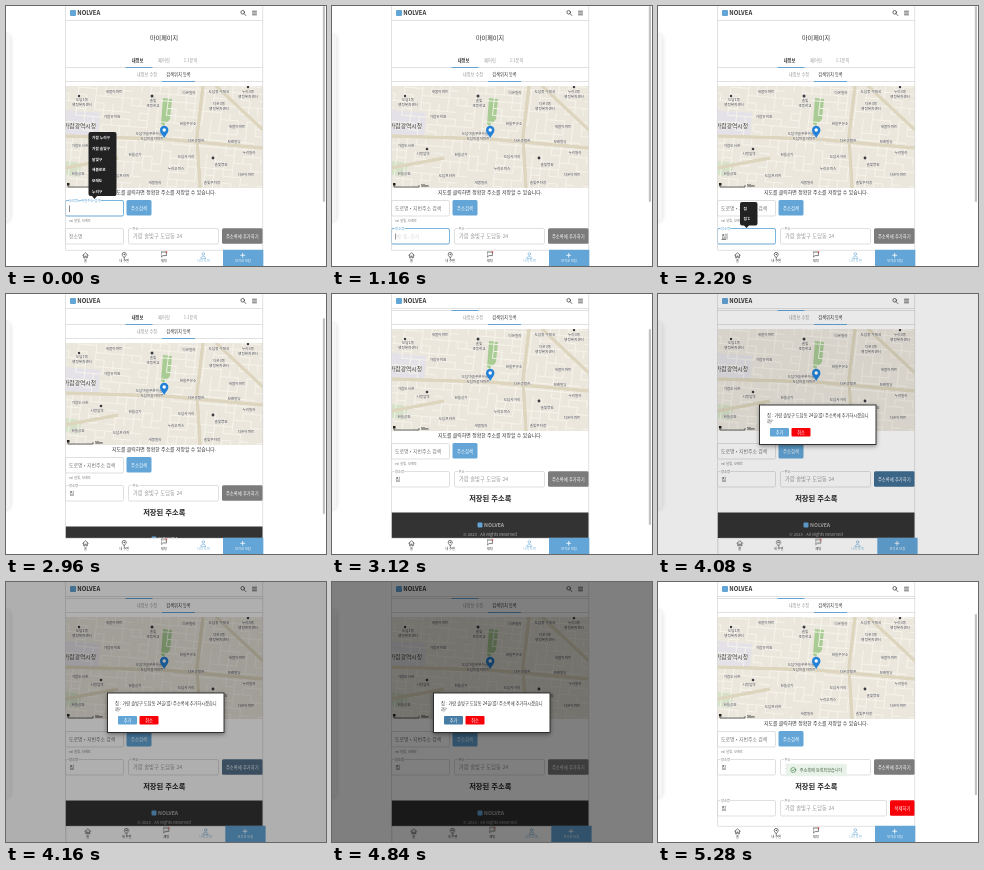
Write an HTML page that moves like this. It is 320 px wide and 260 px high and loops after 5360 ms.

```html
<!DOCTYPE html>
<html lang="ko">
<head>
<meta charset="utf-8">
<title>마이페이지</title>
<style>
html, body { margin: 0; width: 100%; height: 100%; overflow: hidden; background: #fff; }
svg { display: block; width: 100vw; height: 100vh; }
text { font-family: "Noto Sans CJK KR", "Noto Sans CJK", "Noto Sans", sans-serif; font-size: 4.9px; fill: #333; white-space: pre; }
.mid { text-anchor: middle; }
.bold { font-weight: 700; }
.white { fill: #fff; }
.gray { fill: #999; }
.line { fill: none; stroke: #444; stroke-width: .8; stroke-linecap: round; stroke-linejoin: round; }
.rule { stroke: #d4d4d4; stroke-width: .7; }
.box { fill: #fff; stroke: #cacaca; stroke-width: .6; }
.focus { fill: none; stroke: #6fb0de; stroke-width: .9; }
.blue { fill: #62a5d6; }
.legend { font-size: 3.2px; fill: #777; stroke: #fff; stroke-width: 1.6px; paint-order: stroke; }
.label { stroke: #fff; stroke-width: 1.6px; paint-order: stroke; }
.addr { font-size: 5.3px; }
.btn { font-size: 4.3px; font-weight: 500; fill: #fff; text-anchor: middle; }
.tab { font-size: 4.2px; text-anchor: middle; }
.tip text { font-size: 3.7px; font-weight: 700; fill: #fff; }
.place { font-size: 3.6px; font-weight: 500; fill: #47454c; text-anchor: middle; stroke: #f6f4ee; stroke-width: .6px; paint-order: stroke; }
.nav text { font-size: 3.2px; text-anchor: middle; }
.dialog text { font-size: 4.2px; }
.dialog .addr { font-size: inherit; }

/* one loop is 5360 ms, 1% = 53.6 ms */
.a { animation: 5360ms linear infinite; }
.step { animation-timing-function: step-end; }
.search-on { animation-name: search-on; }
.search-label { animation-name: search-label; }
.name-on { animation-name: name-on; }
.name-label { animation-name: name-label; }
.name-caret { animation-name: name-caret; }
.hint { animation-name: hint; }
.key1 { animation-name: key1; }
.key2 { animation-name: key2; }
.key3 { animation-name: key3; }
.compose { animation-name: compose; }
.scroll { animation-name: scroll; }
.thumb { animation-name: thumb; }
.hover-add { animation-name: hover-add; }
.shade { animation-name: shade; }
.dialog { animation-name: dialog; }
.nav { animation-name: nav; }
.hover-ok { animation-name: hover-ok; }
.saved { animation-name: saved; }
.footer { animation-name: footer; }
.toast { animation-name: toast; }
.caret { fill: #333; animation: blink 1072ms step-end infinite; }
.chat { animation: bounce 1072ms ease-in-out infinite; }

@keyframes search-on { 0% { opacity: 1 } 18.66%, 100% { opacity: 0 } }
@keyframes search-label {
  0%, 18.66% { transform: translate(63px, 195.6px) scale(.68); fill: #5ba3d6; animation-timing-function: ease-out }
  21.4%, 100% { transform: translate(63px, 203.8px) scale(1); fill: #777 }
}
@keyframes name-on { 0% { opacity: 0 } 18.66% { opacity: 1 } 48.51%, 100% { opacity: 0 } }
@keyframes name-label {
  0%, 18.66% { transform: translate(63px, 231.8px) scale(1); fill: #888; animation-timing-function: ease-out }
  22.39%, 48.5% { transform: translate(63px, 223.8px) scale(.68); fill: #5ba3d6 }
  50%, 100% { transform: translate(63px, 223.8px) scale(.68); fill: #777 }
}
@keyframes name-caret { 0% { transform: none } 29.1%, 100% { transform: translateX(5.5px) } }
@keyframes hint { 0%, 18.66% { opacity: 0 } 23%, 29.09% { opacity: .5 } 29.1%, 100% { opacity: 0 } }
@keyframes key1 { 0% { opacity: 0 } 29.1% { opacity: 1 } 32.84%, 100% { opacity: 0 } }
@keyframes key2 { 0% { opacity: 0 } 32.84% { opacity: 1 } 36.57%, 100% { opacity: 0 } }
@keyframes key3 { 0% { opacity: 0 } 36.57%, 100% { opacity: 1 } }
@keyframes compose { 0% { opacity: 0 } 36.57% { opacity: 1 } 48.51%, 100% { opacity: 0 } }
@keyframes scroll {
  0%, 52.99% { transform: none; animation-timing-function: ease-out }
  57.46%, 100% { transform: translateY(-45px) }
}
@keyframes thumb {
  0%, 52.99% { transform: none; opacity: 1; animation-timing-function: ease-out }
  57.46%, 74.62% { transform: translateY(35px); opacity: 1 }
  74.63%, 91.03% { transform: translateY(35px); opacity: 0 }
  91.04%, 94.02% { transform: translateY(35px); opacity: 1 }
  94.03%, 100% { transform: translateY(32px) scaleY(.925); opacity: 1 }
}
@keyframes hover-add { 0%, 67.16% { fill: #7b7b7b } 70.9%, 76.5% { fill: #416e94 } 80%, 100% { fill: #7b7b7b } }
@keyframes shade {
  0%, 74.63% { opacity: 0; animation-timing-function: ease-in-out }
  79.85%, 91.04% { opacity: .5; animation-timing-function: ease-in-out }
  94.03%, 100% { opacity: 0 }
}
@keyframes dialog { 0% { opacity: 0 } 74.63% { opacity: 1 } 91.04%, 100% { opacity: 0 } }
@keyframes nav { 0% { transform: none } 74.63% { transform: translateX(2.3px) } 91.04%, 100% { transform: none } }
@keyframes hover-ok { 0%, 83.96% { fill: #62a5d6 } 86%, 100% { fill: #477da5 } }
@keyframes saved { 0% { opacity: 0 } 94.03%, 100% { opacity: 1 } }
@keyframes footer { 0% { transform: none } 94.03%, 100% { transform: translateY(34px) } }
@keyframes toast {
  0%, 94.78% { opacity: 0; transform: translate(158.3px, 188px) scale(.85); animation-timing-function: ease-out }
  98%, 100% { opacity: 1; transform: translate(158.3px, 188px) }
}
@keyframes blink { 0% { opacity: 1 } 50%, 100% { opacity: 0 } }
@keyframes bounce { 0%, 30%, 100% { transform: none } 65% { transform: translateY(-.8px) } }
</style>
</head>
<body>
<svg viewBox="0 0 320 260">
  <defs>
    <clipPath id="mapClip"><rect x="59.5" y="80" width="197.5" height="102"/></clipPath>
    <filter id="soft" x="-100%" y="-20%" width="300%" height="140%"><feGaussianBlur stdDeviation="2"/></filter>
    <filter id="lift" x="-20%" y="-30%" width="140%" height="170%"><feDropShadow dx="0" dy="1.5" stdDeviation="2" flood-opacity=".4"/></filter>
  </defs>
  <rect width="320" height="260" fill="#fff"/>
  <rect x="-9" y="28" width="14" height="188" rx="5" fill="#e2e2e2" filter="url(#soft)"/>
  <rect x="-9" y="28" width="13" height="187" rx="4" fill="#f6f6f6"/>
  <rect class="a thumb" x="316.8" width="2.2" height="196" rx="1.1" fill="#c2c2c2"/>

  <g class="a scroll">
    <text class="mid" x="158" y="33.8" style="font-size:6.1px">마이페이지</text>
    <text class="tab bold" x="131.5" y="55.6">내정보</text>
    <text class="tab gray" x="158" y="55.6">페어링</text>
    <text class="tab gray" x="184.5" y="55.6">1:1문의</text>
    <path class="rule" d="M59.5 61.5H257M59.5 75.5H257"/>
    <rect class="blue" x="119.5" y="61" width="27" height="1"/>
    <text class="tab gray" x="141" y="69.7">내정보 수정</text>
    <text class="tab" x="172.5" y="69.7">검색위치 등록</text>
    <rect class="blue" x="156" y="75" width="33" height="1"/>

    <g clip-path="url(#mapClip)">
      <rect x="59" y="80" width="199" height="102" fill="#ebe7dd"/>
      <path fill="#e4e2e8" d="M59 104l35 3-2 24-33-3z"/>
      <path fill="#a9cc95" d="M157 92l9 1-2 20-6 7-3-2z"/>
      <path fill="#d6e2c8" d="M60 155l16 2-3 14-13-2z"/>
      <path id="lanes" fill="none" stroke="#f8f5ec" stroke-width=".9"/>
      <g fill="none" stroke-linejoin="round">
        <path id="roads" stroke="#ddd5bd" stroke-width="3" d="M59 130L158 133 257 142M197 80L191 130 194 182M210 80L257 124M59 162L112 152"/>
        <use href="#roads" style="stroke:#f9f0d0;stroke-width:2.2"/>
      </g>
      <g id="places"></g>
      <g fill="#3c3a42"><circle cx="146" cy="90" r="1.5"/><circle cx="73" cy="90" r="1.2"/><circle cx="95" cy="143" r="1.3"/><circle cx="207" cy="152" r="1.4"/><circle cx="242" cy="81" r="1.2"/></g>
      <text x="58" y="122" style="font-size:5.8px;stroke:#f6f4ee;stroke-width:.8px;paint-order:stroke">가람광역시청</text>
      <path fill="#2382d8" d="M158.2 132.3c-1-3-4.2-5-4.2-8.3a4.2 4.2 0 0 1 8.4 0c0 3.3-3.2 5.3-4.2 8.3z"/>
      <circle cx="158.2" cy="124" r="1.7" fill="#fff"/>
      <path class="line" d="M62 179.5v1.500h25v-1.500"/>
      <rect x="61" y="177" width="2.500" height="2.500" fill="#222"/>
      <text x="89" y="180.500" class="bold" style="font-size:3.500px">50m</text>
    </g>

    <text class="mid" x="158" y="188">지도를 클릭하면 정확한 주소를 저장할 수 있습니다.</text>
    <rect class="box" x="59.5" y="194.5" width="58" height="15.5" rx="1.5"/>
    <rect class="focus a step search-on" x="59.5" y="194.5" width="58" height="15.5" rx="1.5"/>
    <text class="label a search-label">도로명 • 지번주소 검색</text>
    <g class="a step search-on"><rect class="caret" x="63" y="199.5" width=".6" height="6.5"/></g>
    <text x="63" y="215.6" style="font-size:3.2px;fill:#777">ex) 달빛, 모래로</text>
    <rect class="blue" x="120.5" y="194" width="25" height="15.5" rx="1.5"/>
    <text class="btn" x="133" y="203.6">주소검색</text>

    <rect class="box" x="59.5" y="222.5" width="58" height="15.5" rx="1.5"/>
    <rect class="focus a step name-on" x="59.5" y="222.5" width="58" height="15.5" rx="1.5"/>
    <text class="label a name-label">장소명</text>
    <text class="gray a hint" x="63.5" y="232">예) 집, 회사</text>
    <text class="a step key1" x="63.5" y="232">ㅈ</text>
    <text class="a step key2" x="63.5" y="232">지</text>
    <text class="a step key3" x="63.5" y="232">집</text>
    <rect class="a step compose" x="63.5" y="233.3" width="4.5" height=".6" fill="#333"/>
    <g class="a step name-on"><g class="a step name-caret"><rect class="caret" x="63" y="227.5" width=".5" height="6"/></g></g>
    <rect class="box" x="122.5" y="222.5" width="90" height="15.5" rx="1.5"/>
    <text class="legend" x="126.5" y="223.8">주소</text>
    <text class="gray addr" x="127" y="232"></text>
    <rect class="a hover-add" x="216" y="222.2" width="41" height="15.6" rx="1.5"/>
    <text class="btn" x="236.3" y="231.7">주소록에 추가하기</text>
    <text class="mid bold" x="158.3" y="251.8" style="font-size:7.3px;fill:#222">저장된 주소록</text>

    <g class="a step saved">
      <rect class="box" x="59.5" y="263.5" width="58" height="15.5" rx="1.5"/>
      <text class="legend" x="63" y="264.8">장소명</text>
      <text x="63.5" y="273">집</text>
      <rect class="box" x="122.5" y="263.5" width="106" height="15.5" rx="1.5"/>
      <text class="legend" x="126.5" y="264.8">주소</text>
      <text class="gray addr" x="127" y="273"></text>
      <rect x="232" y="263.2" width="25" height="15.6" rx="1.5" fill="#f80008"/>
      <text class="btn" x="244.5" y="272.7">삭제하기</text>
    </g>
    <g class="a step footer">
      <rect x="59.5" y="263.5" width="197.5" height="44" fill="#333"/>
      <rect class="blue" x="145.5" y="273.5" width="5" height="5" rx="1"/>
      <text class="bold" x="152" y="278" style="font-size:5.2px;fill:#aaa">NOLVEA</text>
      <text class="mid" x="158" y="286.7" style="font-size:4.1px;fill:#aaa">© 2023 . All Rights Reserved</text>
    </g>

    <g class="tip a step search-on">
      <path fill="#222" d="M84.5 126h24a2 2 0 0 1 2 2v60a2 2 0 0 1-2 2H91l-2.5 3-2.5-3h-1.5a2 2 0 0 1-2-2v-60a2 2 0 0 1 2-2z"/>
      <g id="tipList"></g>
    </g>
    <g class="tip a step compose">
      <path fill="#222" d="M84 196h13.500a2 2 0 0 1 2 2v19.500a2 2 0 0 1-2 2h-6.500l-2.500 2.500L86 219.500h-2a2 2 0 0 1-2-2V198a2 2 0 0 1 2-2z"/>
      <text x="85.5" y="203.5">집</text><text x="85.5" y="214.3">집ㅎ</text>
    </g>
  </g>

  <rect x="59.5" width="197.5" height="14.5" fill="#fff"/>
  <path class="rule" d="M59.5 14.5H257M59.5 0V260M256.7 0V260"/>
  <rect class="blue" x="64" y="4" width="6" height="6" rx="1"/>
  <text class="bold" x="71.3" y="9.3" style="font-size:5.9px">NOLVEA</text>
  <g class="line"><circle cx="236.7" cy="6.3" r="1.8"/><path d="M238.2 7.8l1.6 1.7M246.5 5.200h4M246.5 7h4M246.5 8.800h4"/></g>

  <g class="nav a step">
    <rect x="57.2" y="244" width="199.5" height="16" fill="#fff"/>
    <path class="rule" d="M59.5 244.3H256.5"/>
    <g class="line" style="stroke-width:.7">
      <path d="M76.8 249.2l2.7-2.4 2.7 2.4M77.6 249v2.8h1.3v-1.7h1.2v1.7h1.3V249"/>
      <path d="M118.2 252c-.7-1.5-2-2.2-2-3.6a2 2 0 0 1 4 0c0 1.4-1.3 2.1-2 3.6z"/><circle cx="118.2" cy="248.4" r=".4"/>
      <g class="chat"><path d="M155.4 246h5v3.600h-3.300l-1.700 1.300z"/><circle cx="160.5" cy="246" r=".8" fill="#e33" stroke="none"/></g>
      <g stroke="#7fb3da"><circle cx="197.3" cy="248" r="1.3"/><path d="M194.8 252c.3-2.5 4.7-2.5 5 0z"/></g>
    </g>
    <text x="79.5" y="256.2">홈</text><text x="118.2" y="256.2">내 주변</text><text x="158" y="256.2">채팅</text>
    <text x="197.3" y="256.2" style="fill:#7fb3da">나의 토픽</text>
    <rect class="blue" x="217" y="243.800" width="40.300" height="16.500"/>
    <path class="line" d="M234.7 249.3h4M236.700 247.300v4" style="stroke:#fff"/>
    <text class="white" x="237" y="256.2">모각코 모집</text>
  </g>

  <rect class="a shade" width="320" height="260"/>
  <g class="a step dialog">
    <rect x="101.5" y="111" width="116.5" height="39.5" fill="#fff" stroke="#222" stroke-width=".9" filter="url(#lift)"/>
    <text x="109" y="122.5">집 : <tspan class="addr"></tspan>을(를) 주소록에 추가하시겠습니</text>
    <text x="109" y="128.7">까?</text>
    <rect class="a hover-ok" x="112" y="134" width="19" height="8.5" rx="1"/><text class="btn" x="121.5" y="139.8">추가</text>
    <rect x="133.5" y="134" width="19" height="8.5" rx="1" fill="#f80008"/><text class="btn" x="143" y="139.8">취소</text>
  </g>

  <g class="a toast">
    <rect x="-30.500" y="-6.300" width="61" height="12.600" rx="1.500" fill="#e8f2e8"/>
    <g class="line" style="stroke:#5a8f5d;stroke-width:.7"><circle cx="-23" r="2.500"/><path d="M-24.200 0l.9 1 1.700-1.900"/></g>
    <text x="-16.500" y="1.500" style="font-size:4.100px;fill:#3c5c3e">주소록에 등록되었습니다</text>
  </g>
</svg>
<script>
const $ = id => document.getElementById(id);

function addText(parent, x, y, text, cls) {
  const el = document.createElementNS("http://www.w3.org/2000/svg", "text");
  el.setAttribute("x", x);
  el.setAttribute("y", y);
  if (cls) el.setAttribute("class", cls);
  el.textContent = text;
  parent.append(el);
}

document.querySelectorAll(".addr").forEach(el => el.textContent = "가람 솔빛구 도담동 24");

["가람 누리구", "가람 솔빛구", "달빛구", "새봄로로", "모래도", "누리구"]
  .forEach((name, i) => addText($("tipList"), 86, 133.3 + i * 10.7, name));

// Side streets: a slightly turned grid with seeded gaps
let seed = 11;
const rand = () => (seed = seed * 16807 % 2147483647) / 2147483647;
let lanes = "";
for (let x = 55; x < 280; x += 9)
  for (let y = 66; y < 190; y += 7) {
    const start = `M${x - (y - 80) * .12} ${y + (x - 59) * .08}`;
    if (rand() < .6) lanes += start + "l9 .7";
    if (rand() < .65) lanes += start + "l-.9 7";
  }
$("lanes").setAttribute("d", lanes);

const places = `76 95 도담1동|76 100 행정복지센터|108 87 새봄아파트|147 96 솔빛|147 101 초등학교
183 88 다온빌라|213 87 도담동 우체국|242 87 누리3동|242 92 행정복지센터|213 99 다온3동
213 104 행정복지센터|106 112 가람유치원|143 129 도담마을푸른하늘|146 134 도담마을아파트|182 119 한들주유소
231 122 새봄아파트|190 136 다온생활관|228 137 모래빌딩|74 141 가람도서관|91 149 시청앞역
129 150 한들상가|180 152 도담사거리|215 160 솔빛병원|243 148 누리빌라|72 169 한들공원
115 171 도담프라자|149 178 새봄빌라|206 178 솔빛주차장|240 170 다온아파트|170 164 누리오피스`;
places.split(/[|\n]/).forEach(row => {
  const [x, y, ...name] = row.split(" ");
  addText($("places"), x, y, name.join(" "), "place");
});
</script>
</body>
</html>
```
